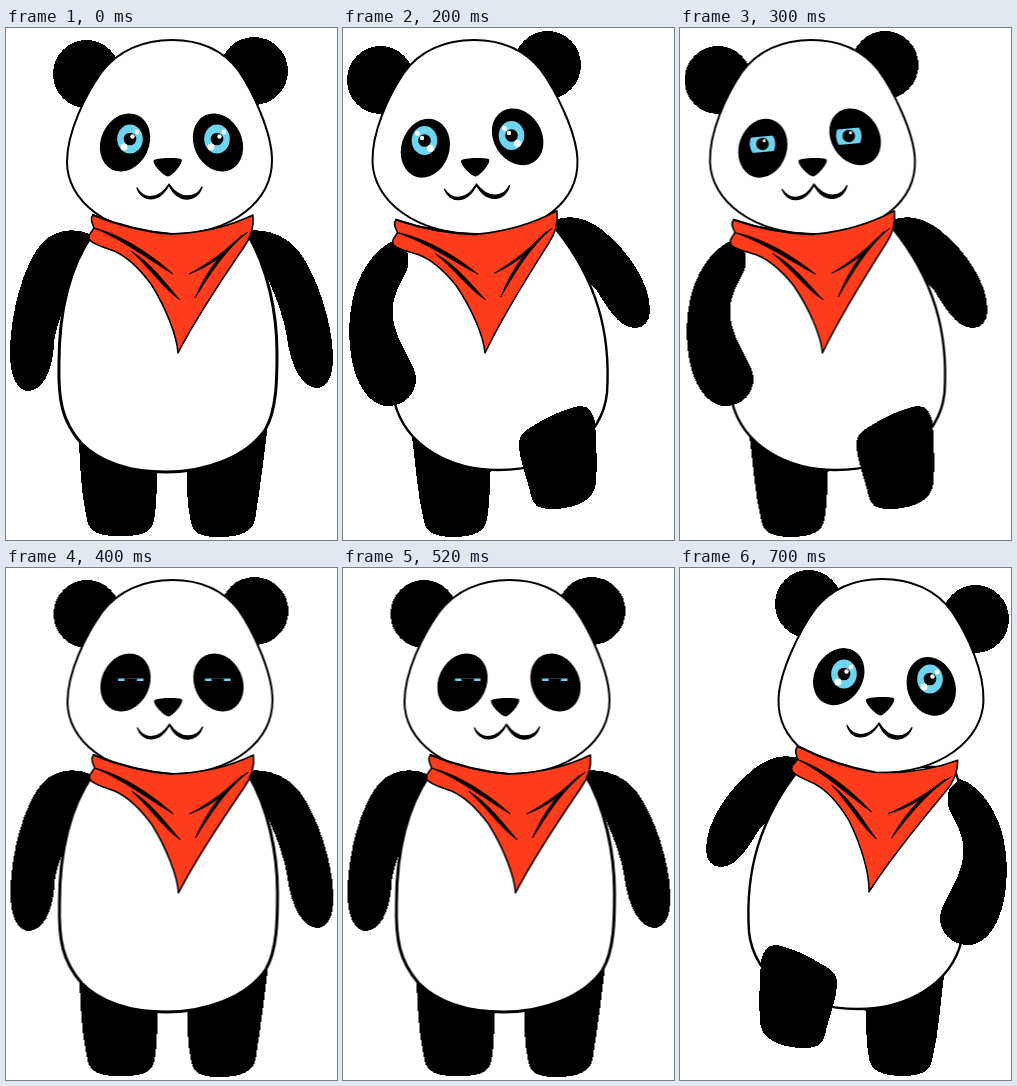
An HTML page for the animation above (800 ms loop, 331 by 512 pixels).

```html
<!DOCTYPE html>
<html lang="en">
<head>
<meta charset="utf-8">
<title>Dancing panda</title>
<style>
  html, body { margin: 0; width: 100%; height: 100%; overflow: hidden; background: #fff; }
  svg { display: block; width: 100%; height: 100%; }
  .skin { fill: #fff; stroke: #000; stroke-width: 2.4; }
  .fur { shape-rendering: crispEdges; }
  .line { fill: none; stroke: #000; stroke-width: 2.2; stroke-linecap: round; stroke-linejoin: round; }
  .fold { stroke: #000; stroke-width: .8; }
  .dance, .mid, .left, .right, .early, .late, .blink, .wake { animation: 800ms step-end infinite; }
  .left, .right, .late, .blink, .wake { opacity: 0; }
  .dance { animation-name: nudge; }
  .mid { animation-name: mid; }
  .left { animation-name: left; }
  .right { animation-name: right; }
  .early { animation-name: early; }
  .late { animation-name: late; }
  .blink { animation-name: blink; }
  .wake { animation-name: wake; }
  @keyframes nudge {
    0% { transform: none; }
    37.5% { transform: translate(.5px, 0); }
    75% { transform: none; }
    87.5%, 100% { transform: translate(0, -1px); }
  }
  /* poses */
  @keyframes mid { 0%, 50% { opacity: 1; } 25%, 75%, 100% { opacity: 0; } }
  @keyframes left { 0%, 50%, 100% { opacity: 0; } 25% { opacity: 1; } }
  @keyframes right { 0% { opacity: 0; } 75%, 100% { opacity: 1; } }
  /* lids: open, then half or shut from 300 ms, open again from 700 ms */
  @keyframes early { 0% { opacity: 1; } 37.5%, 100% { opacity: 0; } }
  @keyframes late { 0% { opacity: 0; } 37.5%, 100% { opacity: 1; } }
  @keyframes blink { 0%, 87.5%, 100% { opacity: 0; } 37.5% { opacity: 1; } }
  @keyframes wake { 0% { opacity: 0; } 87.5%, 100% { opacity: 1; } }
</style>
</head>
<body>
<svg viewBox="0 0 331 512" preserveAspectRatio="none">
  <defs>
    <clipPath id="halfLid"><path d="M-14 -7.5 H14 V8 H-14Z"/></clipPath>
    <clipPath id="shutLid"><path d="M-14 -.5 H14 V2 H-14Z"/></clipPath>

    <g id="iris">
      <ellipse rx="12.8" ry="14.5" fill="#6fd4ee"/>
      <circle r="6.3"/>
    </g>
    <g id="eye">
      <use href="#iris"/>
      <circle cx="2.5" cy="-2.5" r="2.2" fill="#fff"/>
      <circle cx="-6" cy="8" r="3.4" fill="#fff"/>
      <circle cx="7" cy="-7" r="2.4" fill="#fff"/>
    </g>
    <g id="half"><use href="#iris" clip-path="url(#halfLid)"/><circle cx="2" cy="-3" r="1.5" fill="#fff"/></g>
    <g id="shut"><use href="#iris" clip-path="url(#shutLid)"/></g>

    <g id="patches">
      <ellipse rx="24" ry="30" transform="translate(119 114.5) rotate(25)"/>
      <ellipse rx="24" ry="30" transform="translate(212 114.5) rotate(-25)"/>
    </g>
    <path id="nose" d="M148 132 C154 129.5 170 129.5 175 131 C179 133 167 148 162 148.5 C157 148 145 135 148 132Z"/>
    <path id="mouth" d="M131 160 C135 173 152 177 163 157 C172 176 191 175 196 159 C190 170.5 174 172.5 163 156 C153 172 138 172 131 160Z"
      stroke="#000" stroke-width="1.3" stroke-linejoin="round"/>

    <path id="head" class="skin" style="stroke-width:2" d="M166 12 C138 12 112 22 95 45 C79 68 61 104 61 134 C61 172 100 206 165 206 C228 206 266 172 266 132 C266 104 246 62 232 42 C215 20 192 12 166 12Z"/>

    <g id="scarf">
      <path d="M87 187 C112 197 138 204 166 206 C196 205 222 199 247 187 C248 198 246 208 238 219 C214 254 190 290 172 325 C171 308 160 280 145 256 C133 240 122 229 108 223 C98 219 88 217 84 212 C81 207 86 204 88 200 C87 196 83 191 87 187Z"
        fill="#ff3c1c" stroke="#000" stroke-width="1.5" stroke-linejoin="round"/>
      <path class="line" d="M87 187 C112 197 138 204 166 206"/>
      <path class="fold" d="M88 200 C114 206 145 226 167 246 C143 232 116 211 88 200Z"/>
      <path class="fold" d="M125 223 C145 235 160 256 174 272 C157 260 144 240 125 223Z"/>
      <path class="fold" d="M236 207 C222 224 205 238 183 246 C203 235 221 222 236 207Z"/>
      <path class="fold" d="M242 204 C219 222 204 246 189 270 C201 242 219 218 242 204Z"/>
    </g>

    <g id="step">
      <path class="fur" d="M68 400 C72 430 74 465 81 494 C84 507 97 509 113 509 C132 508 141 504 144 492 C147 475 147 455 148 430Z"/>
      <path class="fur" d="M212 192 C228 186 243 190 258 201 C285 222 307 255 307 282 C307 294 301 300 292 300 C275 300 264 278 252 260 L222 235Z"/>
      <path class="skin" d="M60 200 C40 240 42 330 51 372 C62 420 110 442 155 442 C215 442 259 410 264 365 C268 305 254 252 212 200Z"/>
      <path class="fur" d="M53 212 C35 218 20 238 12 262 C4 290 4 325 14 350 C21 368 33 378 45 378 C62 378 73 365 73 351 C73 338 58 320 53 303 C46 282 50 268 62 246 C66 240 66 232 64 222Z"/>
      <path class="fur" d="M176 413 C177 407 182 402 190 398 C205 388 222 381 236 378 C245 377 250 384 252 394 C254 420 254 440 253 455 C252 471 235 481 208 481 C196 481 190 478 188 468 C185 452 175 430 176 413Z"/>
      <ellipse class="fur" cx="37.5" cy="52" rx="33.5" ry="34"/>
      <ellipse class="fur" cx="204.5" cy="37" rx="33.5" ry="34"/>
      <use href="#head" transform="matrix(1 0 .03 1 -35.5 0)"/>
    </g>
  </defs>

  <g class="dance">
    <g class="mid">
      <path class="fur" d="M72 395 C74 430 74 462 81 492 C84 506 96 508 114 508 C134 508 145 506 148 493 C151 475 151 455 151 430Z"/>
      <path class="fur" d="M181 430 C180 455 181 475 185 495 C188 509 202 509 217 509 C235 508 246 504 249 492 C254 460 258 430 262 395Z"/>
      <path class="fur" d="M84 206 C70 200 50 200 36 215 C18 235 4 285 4 325 C4 350 12 363 22 363 C36 363 46 345 48 318 C48 308 51 300 54 290 L84 213Z"/>
      <path class="fur" d="M242 203 C262 200 280 208 292 222 C310 245 327 295 327 330 C327 350 320 360 311 360 C297 360 285 340 281 310 C279 295 275 285 270 270Z"/>
      <path class="skin" style="stroke-width:3" d="M86 207 C62 242 53 285 53 335 C52 372 56 393 75 415 C95 435 125 444 160 444 C200 444 240 429 259 402 C271 382 271 350 271 325 C271 285 262 240 241 205Z"/>
      <ellipse class="fur" cx="80.5" cy="46" rx="33.5" ry="34"/>
      <ellipse class="fur" cx="248" cy="43" rx="34" ry="34"/>
      <use href="#head"/>
      <use href="#patches"/>
      <g class="early">
        <use href="#eye" x="124" y="111"/>
        <use href="#eye" x="211" y="111"/>
      </g>
      <g class="late">
        <use href="#shut" x="124.3" y="111"/>
        <use href="#shut" x="211.3" y="111"/>
      </g>
      <use href="#nose"/>
      <use href="#mouth"/>
      <use href="#scarf"/>
    </g>

    <g class="left">
      <use href="#step"/>
      <use href="#patches" transform="translate(-37 0) rotate(-7 165.5 114.5)"/>
      <g class="early">
        <use href="#eye" transform="translate(81.5 112.5) scale(-1 1)"/>
        <use href="#eye" transform="translate(168.5 107.5) scale(-1 1)"/>
      </g>
      <g class="late">
        <use href="#half" transform="translate(82 116) rotate(-5)"/>
        <use href="#half" transform="translate(168.3 108) rotate(-5)"/>
      </g>
      <use href="#nose" x="-29.5"/>
      <use href="#mouth" transform="translate(-29.5 0) rotate(-2.5 163 158)"/>
      <use href="#scarf" transform="matrix(1.005 -.056 .025 1 -39 9.6)"/>
    </g>

    <g class="right">
      <use href="#step" transform="translate(333 0) scale(-1 1)"/>
      <use href="#patches" transform="translate(39.5 0) rotate(6 165.5 114.5)"/>
      <g class="blink">
        <use href="#half" transform="translate(164 107.5) rotate(4)"/>
        <use href="#half" transform="translate(250 116.5) rotate(4)"/>
      </g>
      <g class="wake">
        <use href="#eye" x="164" y="107"/>
        <use href="#eye" x="250" y="112"/>
      </g>
      <use href="#nose" x="38.5"/>
      <use href="#mouth" transform="translate(36 0) rotate(3 163 158)"/>
      <use href="#scarf" transform="matrix(1 .0875 -.1 1 49.5 -15.3)"/>
    </g>
  </g>
</svg>
</body>
</html>
```
